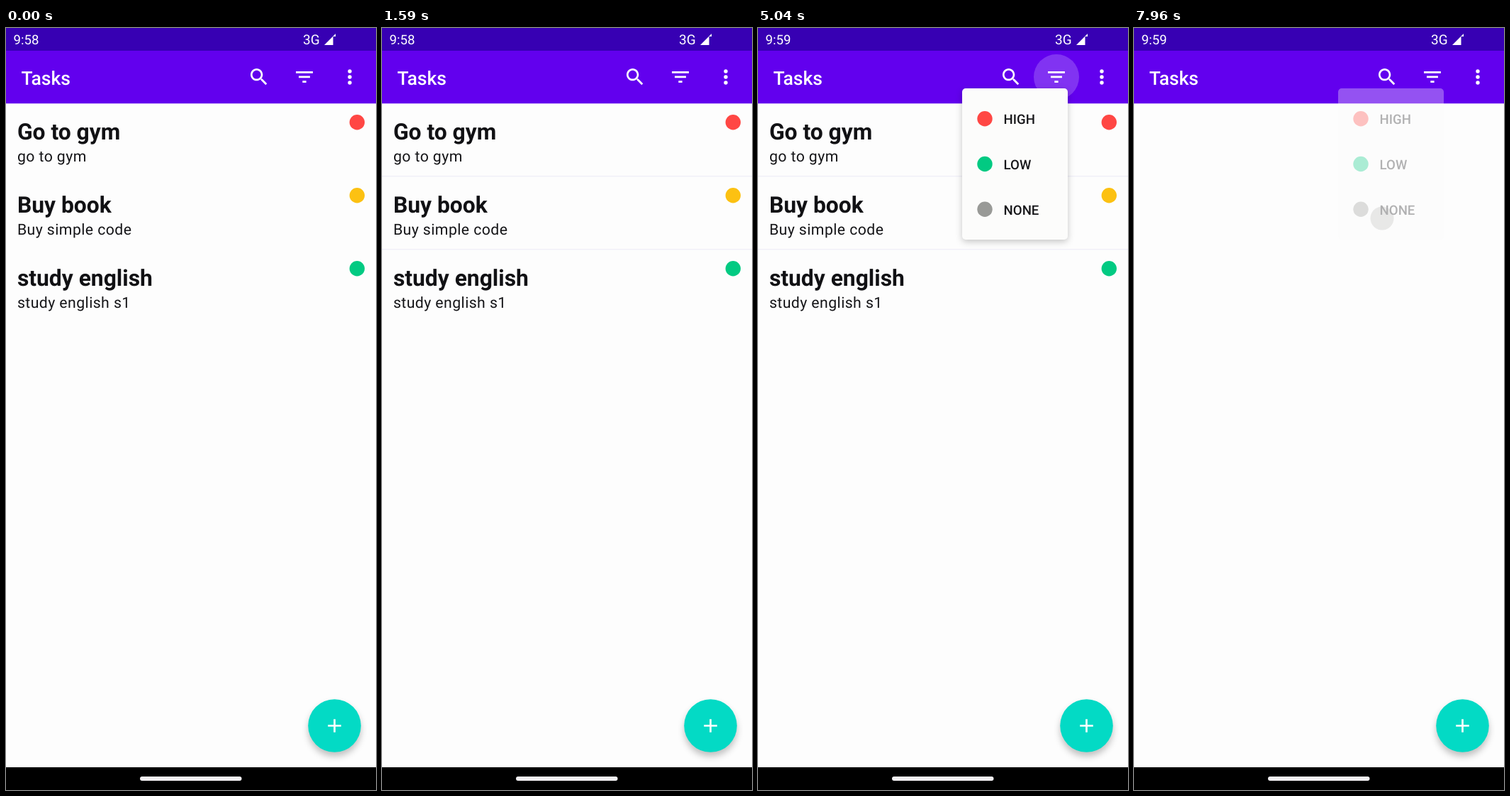
Write an HTML page that moves like this. It is 522 by 1073 pixels and loops after 8000 ms.

```html
<!DOCTYPE html>
<html lang="en">
<head>
<meta charset="utf-8">
<title>Tasks</title>
<style>
  html, body { margin: 0; width: 100%; height: 100%; overflow: hidden; background: #fdfdfd; }
  svg { display: block; width: 100vw; height: 100vh; }
  text { font-family: Roboto, sans-serif; text-rendering: geometricPrecision; }
  .title { font-size: 31.8px; font-weight: 700; fill: #111114; }
  .note { font-size: 21.26px; letter-spacing: .42px; fill: #151518; }
  .label { font-size: 18.6px; font-weight: 500; fill: #17171a; }
  .status { font-size: 18.6px; fill: #fff; }
  #panel.raised { filter: drop-shadow(0 3px 5px rgba(0, 0, 0, .22)); }
  #fab { filter: drop-shadow(0 6px 5px rgba(0, 0, 0, .24)); }
</style>
</head>
<body>
<svg viewBox="0 0 522 1073" preserveAspectRatio="none">
  <defs>
    <clipPath id="reveal"><rect id="revealBox"/></clipPath>
    <clipPath id="rowClip"><rect id="rowBox" x="288" width="149" height="63.7"/></clipPath>
  </defs>
  <rect width="522" height="1073" fill="#fdfdfd"/>
  <g id="lines" fill="#f0eff8">
    <rect y="208" width="522" height="1.4"/>
    <rect y="311" width="522" height="1.4"/>
  </g>
  <g id="list"></g>

  <rect width="522" height="32" fill="#3700b3"/>
  <rect y="32" width="522" height="74.3" fill="#6200ee"/>
  <text class="status" id="clock" x="10.6" y="23">9:58</text>
  <text class="status" x="419" y="22.6" style="font-size:19px">3G</text>
  <path d="M449 24L465 8V12H461.5V24Z" fill="#fff"/>
  <text x="21.5" y="79.8" fill="#fff" font-size="26.5" font-weight="500">Tasks</text>
  <circle id="halo" cx="421" cy="69" fill="#fff"/>
  <g fill="#fff">
    <path transform="translate(341 53) scale(1.329)" d="M15.5 14h-.79l-.28-.27C15.41 12.59 16 11.11 16 9.5 16 5.91 13.09 3 9.5 3S3 5.91 3 9.5 5.91 16 9.5 16c1.61 0 3.09-.59 4.23-1.57l.27.28v.79l5 4.99L20.49 19l-4.99-5zm-6 0C7.01 14 5 11.99 5 9.5S7.01 5 9.5 5 14 7.01 14 9.5 11.99 14 9.5 14z"/>
    <path transform="translate(405 53) scale(1.329)" d="M10 18h4v-2h-4zM3 6v2h18V6zM6 13h12v-2H6z"/>
    <circle cx="485" cy="61" r="2.7"/>
    <circle cx="485" cy="69" r="2.7"/>
    <circle cx="485" cy="77" r="2.7"/>
  </g>

  <circle id="fab" cx="463.5" cy="982.5" r="37.3" fill="#03dac5"/>
  <path d="M454.2 982.5H472.8M463.5 973.2V991.8" stroke="#fff" stroke-width="2.7"/>
  <rect y="1041" width="522" height="32"/>
  <rect x="189" y="1054" width="143.5" height="6" rx="3" fill="#f1eff2"/>

  <g clip-path="url(#reveal)">
    <g id="menu">
      <rect id="panel" x="288" y="85" width="149" height="213" rx="5" fill="#fcfcfb"/>
      <g id="options"></g>
      <g clip-path="url(#rowClip)"><circle id="press" fill="#000" fill-opacity=".25"/></g>
    </g>
  </g>
</svg>
<script>
const LOOP = 8000;
const RED = '#ff4744', AMBER = '#fcc112', GREEN = '#02ca82', GREY = '#999a97';
const $ = id => document.getElementById(id);
const set = (el, attrs) => { for (const k in attrs) el.setAttribute(k, attrs[k]); };
const ramp = (t, start, length) => Math.min(1, Math.max(0, (t - start) / length));
const easeOut = p => 1 - (1 - p) ** 2;
const easeInOut = p => (1 - Math.cos(Math.PI * p)) / 2;

function add(parent, tag, attrs, text = '') {
  const el = document.createElementNS('http://www.w3.org/2000/svg', tag);
  set(el, attrs);
  el.textContent = text;
  parent.append(el);
  return el;
}

// Each task moves from its first place to its mirrored place.
const tasks = [
  ['Go to gym', 'go to gym', RED],
  ['Buy book', 'Buy simple code', AMBER],
  ['study english', 'study english s1', GREEN]
].map(([title, note, color], i) => {
  const g = add($('list'), 'g', {});
  add(g, 'text', { class: 'title', x: 15.9, y: 156.5 }, title);
  add(g, 'text', { class: 'note', x: 15.9, y: 187.7 }, note);
  add(g, 'circle', { cx: 495.3, cy: 132.8, r: 10.7, fill: color });
  return { g, from: i * 103, to: (2 - i) * 94.8 - 8.3 };
});

[['HIGH', RED], ['LOW', GREEN], ['NONE', GREY]].forEach(([name, color], i) => {
  const y = 127.7 + i * 63.8;
  add($('options'), 'circle', { cx: 320, cy: y, r: 10.7, fill: color });
  add($('options'), 'text', { class: 'label', x: 346.6, y: y + 7.2 }, name);
});

// tap: filter icon touched; press: option touched; close: menu starts to fade
const visits = [
  { tap: 2690, press: 3460, grow: 200, close: 3685, row: 0, x: 362, y: 130 },
  { tap: 4700, press: 5330, grow: 180, close: 5500, row: 1, x: 360, y: 193 },
  { tap: 7000, press: 7930, grow: 300, close: 7850, row: 2, x: 350, y: 268 }
];
const OPEN_DELAY = 120, FADE = 165, SORT = 5520, CLEAR = 7850;

function drawMenu(t) {
  const v = visits.find(v => t >= v.tap && t < v.close + FADE);
  $('menu').style.display = v ? '' : 'none';
  $('halo').style.display = v ? '' : 'none';
  if (!v) return;

  set($('halo'), {
    r: 32 * easeOut(ramp(t, v.tap, 200)),
    'fill-opacity': .2 * (1 - ramp(t, v.tap + 350, 240))
  });

  const open = easeOut(ramp(t, v.tap + OPEN_DELAY, 180));
  const fade = 1 - ramp(t, v.close, FADE);
  set($('revealBox'), { x: 421 - 150 * open, y: 75, width: 180 * open, height: 245 * open });
  set($('menu'), { opacity: Math.min(ramp(t, v.tap + OPEN_DELAY, 100), fade) });
  $('panel').classList.toggle('raised', fade === 1);
  set($('rowBox'), { y: 95.8 + v.row * 63.8 });
  set($('press'), { cx: v.x, cy: v.y, r: 160 * ramp(t, v.press, v.grow) });
}

function draw(t) {
  $('clock').textContent = t < 2590 ? '9:58' : '9:59';
  $('lines').style.display = t >= 40 && t < SORT ? '' : 'none';
  const p = easeInOut(ramp(t, SORT, 250));
  for (const { g, from, to } of tasks)
    set(g, { transform: `translate(0 ${from + (to - from) * p})` });
  set($('list'), { opacity: 1 - ramp(t, CLEAR, 100) });
  drawMenu(t);
}

const began = performance.now();
function tick() {
  draw((performance.now() - began) % LOOP);
  requestAnimationFrame(tick);
}
tick();
</script>
</body>
</html>
```
